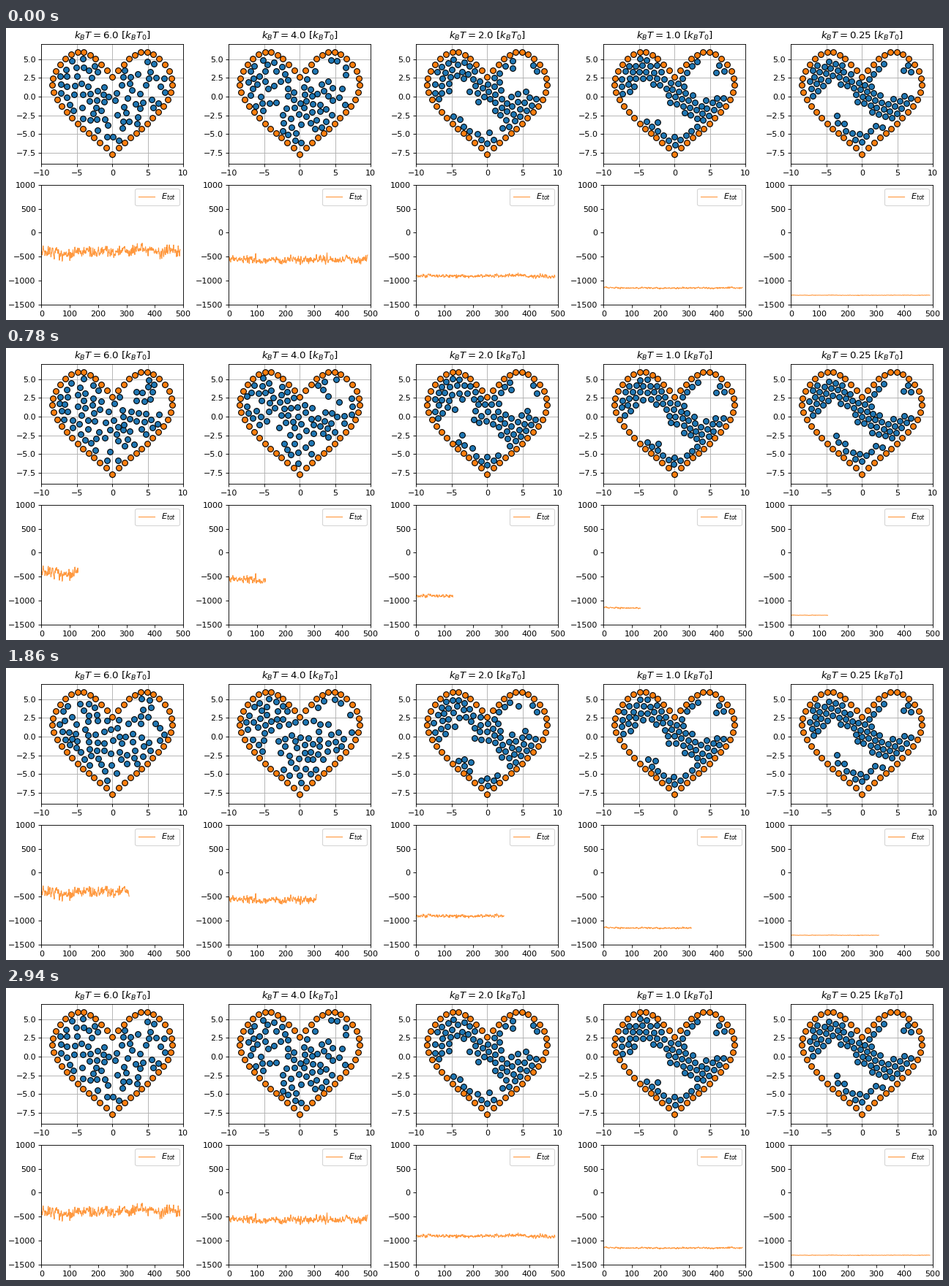
Animation, 1280 px wide and 400 px high, one loop 3000 ms. Source, as a matplotlib script:

```python
import numpy as np
import matplotlib.pyplot as plt
from matplotlib.animation import FuncAnimation

FRAMES, INTERVAL, POINTS_PER_FRAME = 50, 60, 10
TEMPS = np.array([6.0, 4.0, 2.0, 1.0, 0.25])
MEAN_ENERGY = [-385, -560, -900, -1155, -1305]
PARTICLES, WALL_DOTS, SPACING = 78, 48, 0.95
EPS, SIGMA2, DT, SUBSTEPS, WARMUP = 6.0, 0.72, 0.0004, 25, 600
WALL_CORE = 0.72

# Key points of the frozen cluster's branches, with their half widths
BRANCHES = [
    (1.2, [-7.5 + .8j, -6.3 + 2.8j, -3.8 + 3.5j, -1 + 2.3j, .3 + .3j, 2.6 - 1.7j, 6.4 - 1.2j]),
    (0.75, [-4.2 - 3.1j, -1.7 - 5.1j, .3 - 6.5j, 2.6 - 4.2j]),
    (0.45, [.8 + 1.7j, 3.2 + 4.4j]),
    (0.5, [6.1 + 4j, 7 + 3j]),
]


def heart_wall():
    t = 2 * np.pi * np.arange(WALL_DOTS) / WALL_DOTS
    x = 7.68 * np.sin(t) - .64 * np.sin(3 * t) - .1 * np.sin(4 * t) + .13 * np.sin(5 * t)
    # Pull the curve down near the cleft and the tip
    from_axis = np.arcsin(np.abs(np.sin(t))) / (np.pi / 3)
    dip = np.maximum(0, 1 - from_axis) ** 1.8
    y = 5.92 * np.cos(t) - .66 * np.cos(3 * t) - .14 * np.cos(5 * t) + 1.5 - 4.05 * dip
    return x + 1j * y


def wall_distance(pos, wall):
    return np.abs(pos[..., None] - wall).min(axis=-1)


def segment_distance(z, a, b):
    along = np.clip(((z - a) / (b - a)).real, 0, 1)
    return np.abs(z - a - along * (b - a))


def frozen_cluster(wall):
    """Sites of a tilted triangular lattice that lie closest to the branches."""
    i, j = np.mgrid[-20:21, -20:21]
    sites = SPACING * np.exp(-1j * np.pi / 12) * (i + j * np.exp(1j * np.pi / 3)).ravel()
    sites = sites[wall_distance(sites, wall) > 0.8]
    distance = np.min([segment_distance(sites, a, b) / width
                       for width, path in BRANCHES
                       for a, b in zip(path, path[1:])], axis=0)
    return sites[np.argsort(distance)[:PARTICLES]]


def forces(pos, wall):
    """Lennard-Jones forces on complex positions, one row per panel."""
    n = pos.shape[1]
    fixed = np.broadcast_to(wall, (len(pos), len(wall)))
    others = np.concatenate([pos, fixed], axis=1)
    d = pos[:, :, None] - others[:, None, :]
    r2 = np.maximum(d.real ** 2 + d.imag ** 2, 0.3)
    r2[:, np.arange(n), np.arange(n)] = 1e6
    q = SIGMA2 / r2
    q = q * q * q
    return np.einsum("pij,pij->pi", 24 * EPS * (2 * q * q - q) / r2, d)


def simulate(wall):
    """Brownian motion of all panels; returns the positions for each frame."""
    rng = np.random.default_rng(7)
    home = frozen_cluster(wall)
    pos = np.tile(home, (len(TEMPS), 1))
    gap = wall_distance(pos, wall)
    kick = np.sqrt(2 * TEMPS * DT)[:, None]
    # Cold particles stay near their sites, hot ones roam freely
    tether = np.where(TEMPS < 3, 10 / TEMPS ** 2, 0)[:, None]
    history = []
    for step in range(1, WARMUP + (FRAMES - 1) * SUBSTEPS + 1):
        push = DT * (forces(pos, wall) - tether * (pos - home))
        push *= np.minimum(1, 0.1 / np.maximum(np.abs(push), 1e-9))
        noise = rng.normal(size=pos.shape) + 1j * rng.normal(size=pos.shape)
        trial = pos + push + kick * noise
        trial_gap = wall_distance(trial, wall)
        free = (trial_gap > WALL_CORE) | (trial_gap > gap)
        pos = np.where(free, trial, pos)
        gap = np.where(free, trial_gap, gap)
        if step > WARMUP and (step - WARMUP) % SUBSTEPS == 0:
            history.append(pos)
    return history


def smooth_noise(rng, count, width):
    kernel = np.hanning(width + 2)
    kernel /= np.sqrt((kernel ** 2).sum())
    return np.convolve(rng.normal(size=count + len(kernel) - 1), kernel, "valid")


def energy_trace(mean, temp):
    rng = np.random.default_rng(int(100 * temp))
    count = (FRAMES - 1) * POINTS_PER_FRAME
    jitter = smooth_noise(rng, count, 2) + 0.45 * smooth_noise(rng, count, 60)
    return mean + 9 * temp * jitter


wall = heart_wall()
history = simulate(wall)
traces = [energy_trace(m, t) for m, t in zip(MEAN_ENERGY, TEMPS)]

plt.rcParams["font.family"] = "DejaVu Sans"
fig, (top, bottom) = plt.subplots(2, len(TEMPS), figsize=(16, 5), dpi=80,
                                  facecolor="white", layout="constrained")

dot_style = dict(ls="", marker="o", ms=7, mec="black", mew=1)
dots, lines = [], []
for temp, heart_ax, energy_ax in zip(TEMPS, top, bottom):
    heart_ax.set(xlim=(-10, 10), ylim=(-9, 7), title=f"$k_BT={temp}$ [$k_BT_0$]")
    heart_ax.grid(True)
    dots += heart_ax.plot([], [], color="tab:blue", **dot_style)
    heart_ax.plot(wall.real, wall.imag, color="tab:orange", **dot_style)

    energy_ax.set(xlim=(0, 500), ylim=(-1500, 1000), xticks=range(0, 501, 100))
    lines += energy_ax.plot([], [], color="tab:orange", lw=1, alpha=0.8, label="$E_{tot}$")
    energy_ax.legend(loc="upper right")

# Settle the layout once, then keep it fixed
fig.draw_without_rendering()
fig.set_layout_engine("none")


def update(frame):
    # The loop opens on the finished state
    step = frame or FRAMES - 1
    shown = step * POINTS_PER_FRAME
    for dot, line, pos, trace in zip(dots, lines, history[step - 1], traces):
        dot.set_data(pos.real, pos.imag)
        line.set_data(np.arange(shown), trace[:shown])
    return dots + lines


anim = FuncAnimation(fig, update, frames=FRAMES, interval=INTERVAL,
                     repeat=True, repeat_delay=0)
plt.show()
```
